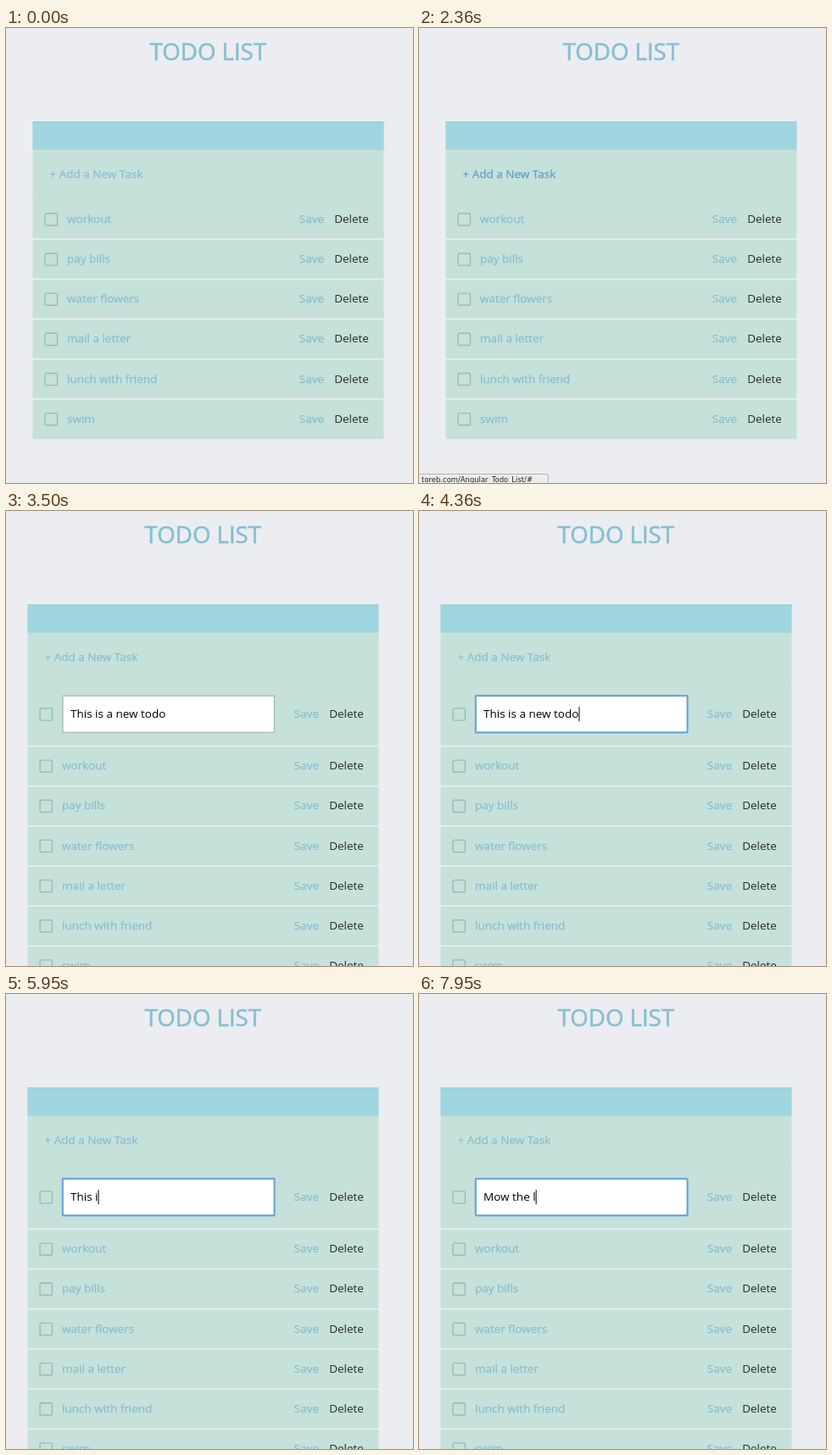
An HTML page that plays this animation: 480x537 px, repeating every 8 s.

```html
<!DOCTYPE html>
<html lang="en">
<head>
<meta charset="utf-8">
<title>Todo list</title>
<style>
  html, body { margin: 0; width: 100%; height: 100%; overflow: hidden; background: #ebedf1; }
  svg { display: block; width: 480px; height: 537px; }
  text { font: 13.5px "Open Sans", sans-serif; white-space: pre; }
  .soft { fill: #8abdd0; stroke: #8abdd0; stroke-width: .25px; }
  .soft.hover { fill: #5f9ec7; stroke: #5f9ec7; }
  .title { font-size: 27.6px; fill: #86bfd1; stroke: #86bfd1; stroke-width: .6px; text-anchor: middle; }
  .dark { fill: #262a2b; }
  .status text { font: 8.44px "DejaVu Sans", sans-serif; fill: #222; text-anchor: end; }
</style>
</head>
<body>
<svg id="stage" viewBox="0 0 480 537">
  <rect width="480" height="537" fill="#ebedf1"/>
  <g id="page">
    <text class="title" x="238.3" y="38">TODO LIST</text>
    <rect x="31.5" y="110.5" width="414" height="93" fill="#c5e1da"/>
    <rect x="31.5" y="110.5" width="414" height="33.2" fill="#a0d6df"/>
    <rect x="31.5" y="110.5" width="414" height="1" fill="#98ccd6"/>
    <text id="add" class="soft" x="51.5" y="177">+ Add a New Task</text>
    <g id="rows"></g>
  </g>
  <g id="status" class="status">
    <path d="M-2 526.5H150Q152.500 526.500 152.500 529V540H-2Z" fill="#ededed" stroke="#b3b3b3"/>
    <text x="134" y="535.6">toreb.com/Angular_Todo_List/#</text>
  </g>
</svg>
<script>
const LOOP = 8000, TOP = 202.2, ROW = 47.16, TALL = 75.3;
const HOVER = 1320, ADDED = 2600, LEFT = 2900, EDIT = 3350, FOCUS = 4300;
const TASK = 'This is a new todo', TYPED = 'Mow the l';
const tasks = [TASK, 'workout', 'pay bills', 'water flowers', 'mail a letter', 'lunch with friend', 'swim'];

// Key presses: a held backspace, then typing
const ERASE = 5450, ERASE_STEP = 42;
const typeTimes = [6330, 6480, 6640, 6820, 7130, 7300, 7450, 7650, 7900];
const keyTimes = [FOCUS, ...[...TASK].map((_, i) => ERASE + i * ERASE_STEP), ...typeTimes];

const $ = id => document.getElementById(id);
const clamp = v => Math.max(0, Math.min(1, v));
const show = (el, on) => el.setAttribute('visibility', on ? 'visible' : 'hidden');

function make(parent, tag, attrs, text = '') {
  const el = document.createElementNS('http://www.w3.org/2000/svg', tag);
  for (const k in attrs) el.setAttribute(k, attrs[k]);
  el.textContent = text;
  return parent.appendChild(el);
}

const rows = tasks.map((name, i) => {
  const g = make($('rows'), 'g', {});
  const back = make(g, 'rect', { x: 31.5, width: 414, height: ROW, fill: '#c5e1da' });
  const line = make(g, 'rect', { x: 31.5, y: -0.8, width: 414, height: 1.6, fill: '#e8f0f0' });
  const body = make(g, 'g', {});
  make(body, 'rect', { x: 46.1, y: 16.6, width: 14.4, height: 14.2, rx: 1.5, fill: 'none', stroke: '#9cb9b5', 'stroke-width': 1.4 });
  const label = make(body, 'text', { class: 'soft', x: 72, y: 27.8 }, name);
  make(body, 'text', { class: 'soft', x: 345.8, y: 27.8 }, 'Save');
  make(body, 'text', { class: 'dark', x: 387.2, y: 27.8 }, 'Delete');
  return { g, back, line, body, label };
});

const first = rows[0];
const field = make(first.g, 'g', {});
const glow = make(field, 'rect', { x: 71.6, y: 14.6, width: 252.2, height: 46, rx: 2.5, fill: '#8fc0e4' });
const box = make(field, 'rect', { x: 73, y: 16, width: 249.4, height: 43, fill: '#fff' });
const value = make(field, 'text', { x: 82, y: 41.8, fill: '#000' });
const caret = make(field, 'rect', { y: 29, width: 1, height: 17, fill: '#000' });

function fieldText(t) {
  const typed = typeTimes.filter(k => k <= t).length;
  if (typed) return TYPED.slice(0, typed);
  const erased = t < ERASE ? 0 : Math.floor((t - ERASE) / ERASE_STEP) + 1;
  return TASK.slice(0, Math.max(0, TASK.length - erased));
}

function caretOn(t) {
  if (t < FOCUS) return false;
  const last = Math.max(...keyTimes.filter(k => k <= t));
  return (t - last) % 1000 < 500;
}

function render(t) {
  const added = t >= ADDED, editing = t >= EDIT, focused = t >= FOCUS;
  $('page').setAttribute('transform', `translate(${editing ? -6 : 0} 0)`);
  $('add').classList.toggle('hover', t >= HOVER && t < LEFT);
  $('status').setAttribute('opacity', Math.min(clamp((t - 1400) / 160), clamp((3240 - t) / 250)));

  let y = TOP;
  rows.forEach((r, i) => {
    const live = i > 0 || added;
    r.g.setAttribute('display', live ? 'inline' : 'none');
    r.g.setAttribute('transform', `translate(0 ${y})`);
    show(r.line, y > TOP);
    if (live) y += i === 0 && editing ? TALL : ROW;
  });

  first.back.setAttribute('height', editing ? TALL : ROW);
  first.body.setAttribute('transform', `translate(0 ${editing ? 14.1 : 0})`);
  first.label.setAttribute('display', editing ? 'none' : 'inline');
  field.setAttribute('display', editing ? 'inline' : 'none');
  glow.setAttribute('display', focused ? 'inline' : 'none');
  box.setAttribute('stroke', focused ? '#5f9fdc' : '#9fb0b0');
  box.setAttribute('stroke-width', focused ? 1.7 : 1.1);

  const text = fieldText(t);
  if (value.textContent !== text) value.textContent = text;
  const on = caretOn(t);
  caret.setAttribute('display', on ? 'inline' : 'none');
  if (on) caret.setAttribute('x', 82 + (text ? value.getComputedTextLength() : 0));
}

const start = performance.now();
function tick() {
  render((performance.now() - start) % LOOP);
  requestAnimationFrame(tick);
}
tick();
</script>
</body>
</html>
```
